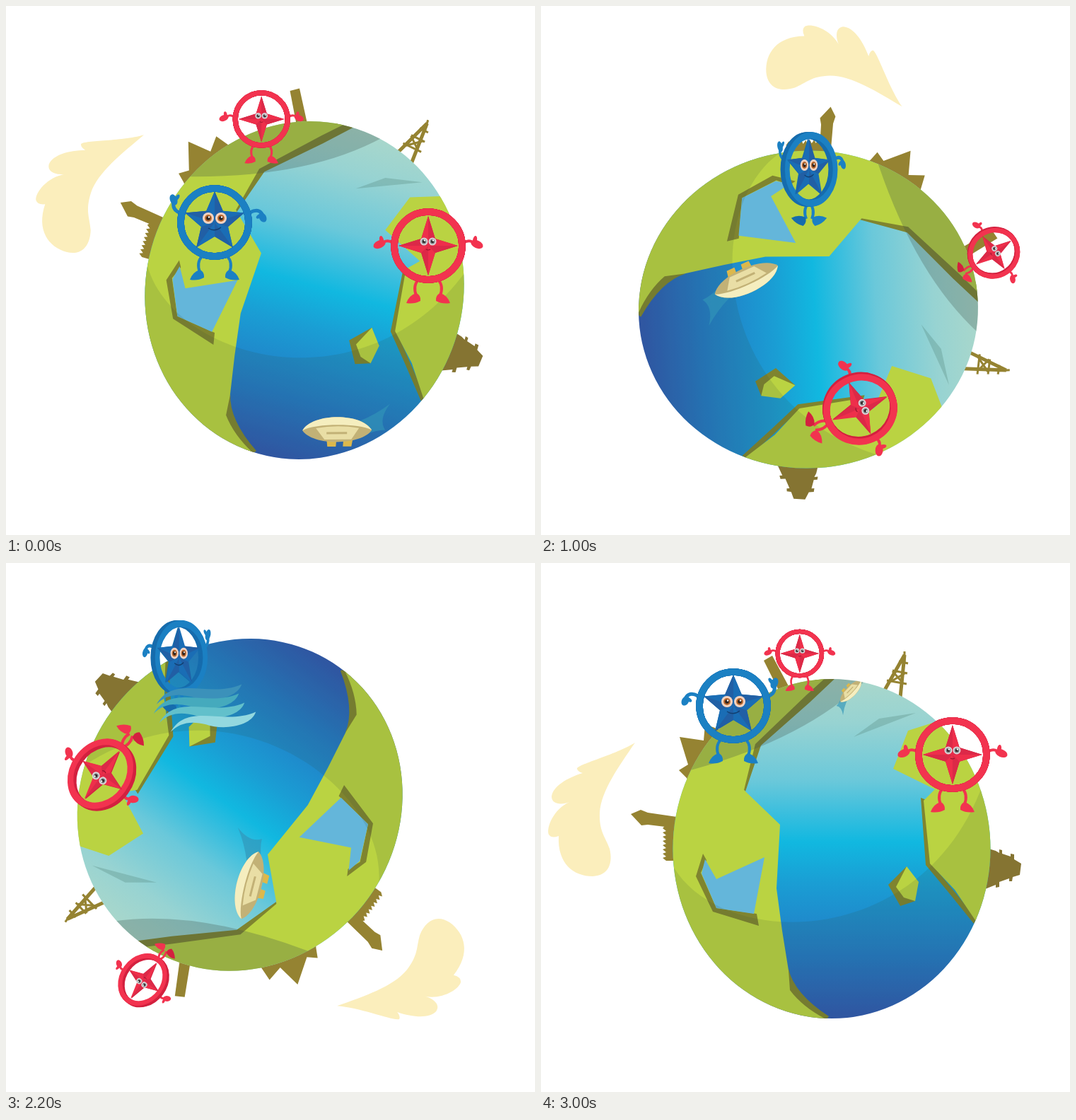
An HTML page with a canvas for the animation above (3.1 s loop, 748 by 748 pixels).

```html
<!DOCTYPE html>
<html lang="en">
<head>
<meta charset="utf-8">
<title>Spinning globe</title>
<style>
html, body { margin: 0; width: 100%; height: 100%; overflow: hidden; background: #fff; }
canvas { display: block; width: 748px; height: 748px; }
</style>
</head>
<body>
<canvas id="stage" width="748" height="748"></canvas>
<script>
const ctx = document.getElementById('stage').getContext('2d');
const RAD = Math.PI / 180, LOOP = 3100;
const OLIVE = '#958332', EDGE = '#7f842f', LAND = '#bad342';
const CX = 411, CY = 404;

// Smooth monotone curve through values placed at the key steps.
const KEYS = [0, 4, 9, 12, 17, 22, 27];
function track(...v) {
  const d = v.slice(1).map((y, i) => (y - v[i]) / (KEYS[i + 1] - KEYS[i]));
  const m = v.map((_, i) => {
    if (i === 0) return d[0];
    if (i === d.length) return d[i - 1];
    const a = d[i - 1], b = d[i];
    return a * b > 0 ? 2 * a * b / (a + b) : 0;
  });
  return n => {
    let i = 0;
    while (i < d.length - 1 && n >= KEYS[i + 1]) i++;
    const h = KEYS[i + 1] - KEYS[i], u = (n - KEYS[i]) / h, w = 1 - u;
    return v[i] * w * w * (1 + 2 * u) + v[i + 1] * u * u * (3 - 2 * u)
      + h * u * w * (m[i] * w - m[i + 1] * u);
  };
}

const globe = {
  x: track(422, 386, 378, 368, 307, 385, 411),
  y: track(402, 417, 429, 427, 358, 329, 404),
  turn: track(15.7, 52.7, 86.5, 119.6, 178.6, 278.6, 360)
};
const ship = {
  x: track(509, 412, 364, 361, 329, 348, 438),
  y: track(582, 557, 489, 436, 350, 275, 181),
  turn: track(-196, -160, -111, -99.6, -132.6, -64.6, -46),
  size: track(1, 1, 1, 1, 1, 1, .43)
};
const blue = {
  x: track(295, 311, 379, 263, 155.5, 409, 272),
  y: track(306, 238, 231, 196, 152, 116, 202),
  spin: track(0, 25, 45, 62, 112, 163, 180)
};
// Red wheels: bearing and distance on the turning globe.
const reds = [
  { bearing: track(-29.8, -24.3, -13.5, -10.8, -6.2, -9, -9.3),
    dist: track(249.6, 262.6, 274, 273.5, 278.5, 289, 279.6),
    size: track(.77, .71, .71, .74, .72, .79, .65),
    roll: track(0, 0, 56, 90, 180, 270, 360) },
  { bearing: track(54.5, 47.3, 66, 65.2, 67.8, 61.8, 52.1),
    dist: track(186, 144, 158, 167.6, 190, 211, 216.6),
    size: () => 1,
    roll: track(0, 0, 67, 90, 180, 270, 360) }
];
const redSpin = track(0, 4, 20, 48, 118, 172, 180);
const legSpread = track(1, .5, .15, .1, .1, .15, 1);

function fill(path, color) {
  ctx.fillStyle = color;
  ctx.fill(new Path2D(path));
}
function stroke(path, color, width) {
  ctx.strokeStyle = color;
  ctx.lineWidth = width;
  ctx.stroke(new Path2D(path));
}
function oval(x, y, rx, ry, color, tilt = 0) {
  ctx.fillStyle = color;
  ctx.beginPath();
  ctx.ellipse(x, y, rx, ry, tilt, 0, 7);
  ctx.fill();
}
function group(x, y, deg, sx, sy, draw) {
  ctx.save();
  ctx.translate(x, y);
  ctx.rotate(deg * RAD);
  ctx.scale(sx, sy);
  draw();
  ctx.restore();
}

const sea = ctx.createLinearGradient(0, 164, 0, 644);
[[0, '#a9d7cb'], [.13, '#97d3d2'], [.3, '#6ac8da'], [.4, '#38bede'], [.48, '#11b8e0'],
 [.6, '#1a9ed4'], [.8, '#227cc6'], [1, '#3057b0']].forEach(([at, c]) => sea.addColorStop(at, c));

function drawSurroundings() {
  fill('M133 254C104 272 50 285 51 291Q52 295 59 297C36 304 17 316 15 330C15 342 30 342 40 338C18 348 7 374 11 384Q15 390 25 386C23 425 46 443 73 443C96 442 102 424 97 404C91 387 82 380 83 353C85 322 110 288 133 254Z', '#fbeebc');
  fill('M315 138L327 131L350 174L336 180Z', OLIVE);
  fill('M212 312L205 303L195 293L208 285L196 246L230 251L232 228L262 239L270 290Z', OLIVE);
  fill('M127 355L141 349L151 353L192 359V375L151 370L142 371Z', OLIVE);
  let wall = 'M195 372H175';
  for (let y = 375; y < 420; y += 6) wall += `L172 ${y}L177 ${y + 4}`;
  fill(wall + 'L178 421H195Z', OLIVE);
  fill('M630 403L643 407L648 410V405L652 406V411L664 415V411L669 412V419L679 425L677 441L667 444L666 450H662V446L648 451V458L643 459V455L628 461Z', '#857432');
  stroke('M514 130L484 183M514 130L508 190', OLIVE, 5);
  stroke('M514 125V140M506 139L519 142M497 152L518 156M489 166L517 171M497 153L512 170M516 155L494 168', OLIVE, 3);
}

function drawGlobe(n) {
  ctx.save();
  ctx.beginPath();
  ctx.ellipse(CX, CY, 224.5, 240, 0, 0, 7);
  ctx.clip();
  ctx.fillStyle = sea;
  ctx.fillRect(180, 160, 462, 490);

  // western land, its coast edges and lake
  fill('M405 150L416 163L380 197L311 258L289 323L287 321L270 300L290 250Z', EDGE);
  fill('M350 574Q358 609 407 641L400 650L345 612Z', EDGE);
  fill('M407 158L375 187L303 256L287 321L338 370L333 460L341 520L350 576L352 604Q370 628 403 645L350 660L170 600V130Z', LAND);
  fill('M229 411L219 443L243 493L308 513L305 496L248 488L226 438L234 420Z', EDGE);
  fill('M232 419L248 447L316 416L301 496L248 488L227 439Z', '#64b6da');

  // eastern land and island
  fill('M537 332L544 427L574 463L612 510L616 503L552 425L545 335Z', EDGE);
  fill('M498 291L519 237L560 224L660 200V510L614 505L585 462L550 425L541 336L557 320Z', LAND);
  fill('M517 429L491 455L508 485L529 478Z', EDGE);
  fill('M517 429L534 451L529 478L513 473L502 458Z', LAND);

  // shade bands
  fill('M180 415Q185 424 188 431C260 548 540 548 625 312L660 310V660H180Z', 'rgba(50,70,60,.13)');
  fill('M190 298L215 292Q375 248 460 165L440 140H190Z', 'rgba(60,80,70,.27)');
  fill('M442 246L478 220L530 212Z', 'rgba(80,130,120,.3)');

  const s = ship.size(n);
  group(ship.x(n), ship.y(n), ship.turn(n), s, s, drawShip);
  ctx.restore();
}

function drawShip() {
  fill('M-38 -7Q-55 0 -68 0Q-58 15 -75 37Q-55 22 -32 13Z', 'rgba(50,150,185,.65)');
  fill('M-22 -13L-20 -23H-8L-9 -12ZM1 -13L2 -23H14L15 -12Z', '#dcb84c');
  fill('M-49 0C-35 -22 35 -22 49 0C35 25 -35 25 -49 0Z', '#c2b176');
  fill('M-49 0C-30 10 30 10 49 0C35 25 -35 25 -49 0Z', '#f5eebf');
  fill('M-31 3L-20 -13H18L30 3Q0 8 -31 3Z', '#e9dea5');
  stroke('M-14 -4H15', '#c2b176', 3);
}

function starPath(points, outer, inner) {
  let p = '';
  for (let i = 0; i < points * 2; i++) {
    const a = i * Math.PI / points, r = i % 2 ? inner : outer;
    p += `${i ? 'L' : 'M'}${(r * Math.sin(a)).toFixed(2)} ${(-r * Math.cos(a)).toFixed(2)}`;
  }
  return p + 'Z';
}

// As the legs come together the feet tip outwards into a V.
function drawLegs(color, dark, spread, gap) {
  const close = 1 - spread;
  for (const side of [-1, 1]) {
    group(side * gap * spread, 0, 0, side, 1, () => {
      stroke('M-2 48Q6 57 1 70', color, 4);
      group(1 + 4 * close, 70, -50 * close, 1, 1, () =>
        fill('M-6 8Q-7 0 0 -3Q10 0 14 11Q3 13 -6 8Z', side < 0 && close > .5 ? dark : color));
    });
  }
}

function drawArms(isBlue, color) {
  if (isBlue) {
    stroke('M-50 -14Q-60 -18 -58 -29M50 -14Q63 -21 68 -10', color, 5);
    oval(-58, -32, 5, 8, color, -.4);
    oval(-53, -35, 2.5, 5, color, .6);
    oval(68, -7, 5, 7, color, -.5);
    oval(63, -9, 2.5, 5, color, .9);
    return;
  }
  for (const side of [-1, 1]) group(0, 0, 0, side, 1, () => {
    stroke('M50 -4Q57 -9 63 -5', color, 4);
    oval(69, -2, 9, 5.5, color, .4);
    oval(66, -8, 3, 6, color, .2);
  });
}

function drawFace(isBlue) {
  const gap = isBlue ? 9 : 6, r = isBlue ? 8 : 5.5;
  for (const side of [-1, 1]) {
    const x = side * gap;
    oval(x, -6, r, r, isBlue ? '#f4d3c0' : '#d9d6d8');
    oval(x, -6, r * .62, r * .62, isBlue ? '#b9672c' : '#777d83');
    oval(x, -6, r * .35, r * .35, '#2b211f');
    oval(x + 1, -7.5, 1.2, 1.2, '#fff');
  }
  if (isBlue) stroke('M-9 8Q0 14 9 7', '#123f70', 1.5);
  else stroke('M-3 5Q0 7 3 5', '#94152e', 1.2);
}

function drawWheel(isBlue, spin, spread) {
  const main = isBlue ? '#1b80c3' : '#f2334f';
  const dark = isBlue ? '#166cad' : '#d3213f';
  const body = isBlue ? '#1a6db5' : '#ee2f4b';
  const points = isBlue ? 5 : 4;
  const outer = isBlue ? 44 : 42, inner = isBlue ? 20 : 14;
  const c = Math.cos(spin * RAD);
  const sx = Math.sign(c) * Math.max(.2, Math.abs(c));
  const depth = -9 * Math.sin(spin * RAD);
  const star = starPath(points, outer, inner);

  drawLegs(main, dark, spread, isBlue ? 20 : 16);
  group(0, 0, 0, sx, 1, () => drawArms(isBlue, main));
  // The rim is thick, the star inside it thinner.
  for (let i = 5; i >= 0; i--) {
    group(depth * (i / 5 - .5), 0, 0, sx, 1, () => {
      ctx.strokeStyle = i ? dark : main;
      ctx.lineWidth = 9.5;
      ctx.beginPath();
      ctx.arc(0, 0, 48, 0, 7);
      ctx.stroke();
    });
  }
  group(depth * .25, 0, 0, sx, 1, () => fill(star, dark));
  group(0, 0, 0, sx, 1, () => {
    fill(star, body);
    for (let i = 0; i < points; i++) {
      const a = 180 / points * RAD;
      group(0, 0, i * 360 / points, 1, 1, () =>
        fill(`M0 0L0 ${-outer}L${inner * Math.sin(a)} ${-inner * Math.cos(a)}Z`, 'rgba(90,0,50,.12)'));
    }
  });
  group(0, 0, 0, isBlue ? Math.max(.72, Math.abs(c)) : 1, 1, () => drawFace(isBlue));
}

function drawWaves(x, y) {
  ['#3b91ba', '#45aabd', '#62c0cb', '#93d8df'].forEach((color, i) =>
    group(x - 26 + [0, -4, 4, 20][i], y + 60 + i * 13, -3, 1.05, 1, () =>
      fill('M-6 6C20 -36 65 2 110 -16C103 4 65 8 42 -2C22 -9 6 -6 -6 6Z', color)));
}

function draw(n) {
  ctx.clearRect(0, 0, 748, 748);
  const gx = globe.x(n), gy = globe.y(n), turn = globe.turn(n);
  group(gx, gy, turn, 1, 1, () => {
    ctx.translate(-CX, -CY);
    drawSurroundings();
    drawGlobe(n);
  });
  const spread = legSpread(n);
  for (const red of reds) {
    const a = (turn + red.bearing(n)) * RAD, d = red.dist(n), s = red.size(n);
    group(gx + d * Math.sin(a), gy - d * Math.cos(a), red.roll(n), s, s,
      () => drawWheel(false, redSpin(n), spread));
  }
  const bx = blue.x(n), by = blue.y(n);
  group(bx, by, 0, 1, 1, () => drawWheel(true, blue.spin(n), spread));
  if (n >= 15 && n <= 19) drawWaves(bx, by);
}

// Ten steps a second; the pose at each of these ticks is held twice as long.
function stepAt(ms) {
  const tick = Math.floor(ms / 100);
  return tick - [1, 11, 21].filter(hold => tick >= hold).length;
}

const start = performance.now();
function frame() {
  draw(stepAt((performance.now() - start) % LOOP));
  requestAnimationFrame(frame);
}
frame();
</script>
</body>
</html>
```
